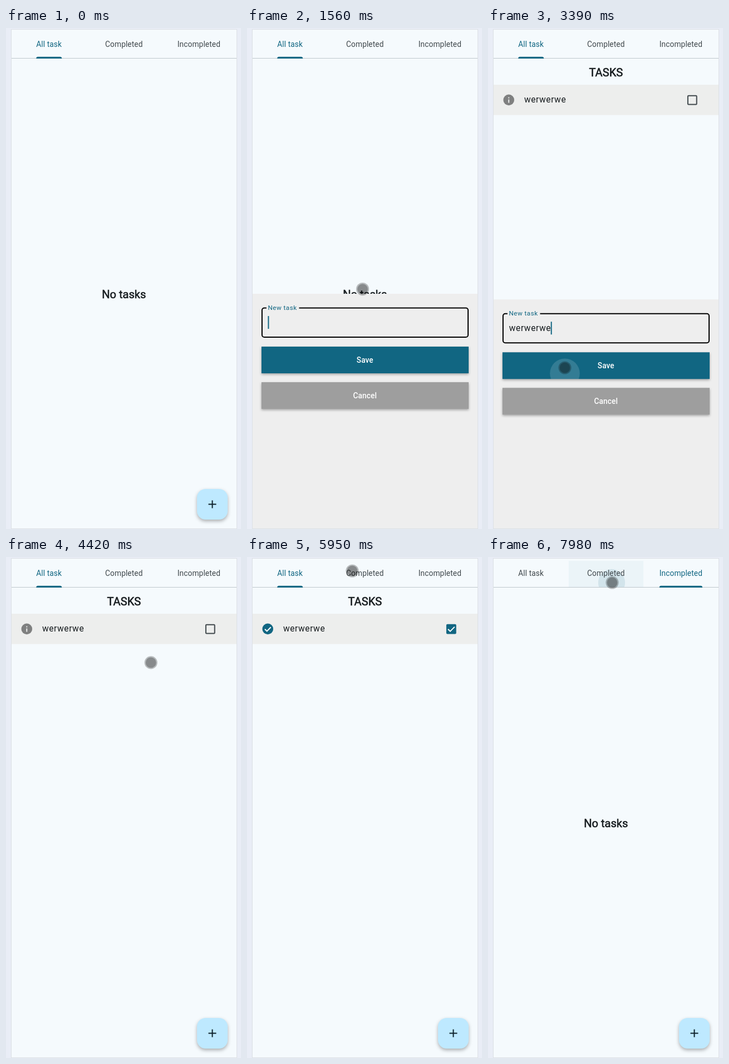
Recreate the animation shown at these times as an HTML page. Size 422x901 px, loop 8000 ms.

```html
<!DOCTYPE html>
<html lang="en">
<head>
<meta charset="utf-8">
<title>Task list</title>
<style>
html, body { margin: 0; width: 100%; height: 100%; overflow: hidden; background: #e9edf6; }
svg { display: block; width: 422px; height: 901px; }
text { font-family: Roboto, "Noto Sans", sans-serif; fill: #171c1f; white-space: pre; }
.mid { text-anchor: middle; }
.tab { font-size: 13.72px; letter-spacing: .1px; }
.title { font-size: 20.1px; stroke: #171c1f; stroke-width: .6px; }
.body { font-size: 15.7px; letter-spacing: .5px; }
.label { font-size: 11.8px; letter-spacing: .4px; fill: #116682; }
.button { font-size: 13.72px; font-weight: 500; letter-spacing: .1px; fill: #fff; }
.raised { filter: drop-shadow(0 2px 2px rgba(0,0,0,.32)); }
.fab { filter: drop-shadow(0 3px 3px rgba(0,0,0,.3)); }
.check { fill: none; stroke: #fff; stroke-width: 2; }
</style>
</head>
<body>
<svg viewBox="0 0 422 901">
  <defs>
    <clipPath id="panelClip"><rect x="10" y="3" width="404" height="897"/></clipPath>
    <clipPath id="tabClip1"><rect x="145" y="7" width="134" height="47"/></clipPath>
    <clipPath id="tabClip2"><rect x="279" y="7" width="135" height="47"/></clipPath>
    <clipPath id="saveClip"><rect x="26" y="573" width="372" height="48"/></clipPath>
    <clipPath id="fabClip"><rect x="343" y="829" width="55" height="55" rx="15.5"/></clipPath>
  </defs>
  <rect width="422" height="901" fill="#e9edf6"/>
  <rect x="9.5" y="2.5" width="405" height="898" fill="#f5fafd" stroke="#dce0e5"/>
  <g clip-path="url(#panelClip)">
    <path d="M10 54.5H414" stroke="#bfc7cc"/>
    <rect id="hover1" x="145" y="7" width="134" height="47" fill="#116682"/>
    <rect id="hover2" x="279" y="7" width="135" height="47" fill="#116682"/>
    <g clip-path="url(#tabClip1)">
      <circle id="rippleA" cx="189" cy="28" fill="#116682"/>
      <circle id="rippleC" cx="222" cy="46" fill="#116682"/>
    </g>
    <g clip-path="url(#tabClip2)"><circle id="rippleB" cx="323" cy="31" fill="#116682"/></g>
    <text id="tab0" class="tab mid" x="77.2" y="34.4">All task</text>
    <text id="tab1" class="tab mid" x="211.8" y="34.4">Completed</text>
    <text id="tab2" class="tab mid" x="346.4" y="34.4">Incompleted</text>
    <path id="bar" fill="#116682"/>

    <text id="empty" class="title mid" x="211.8" y="486">No tasks</text>
    <g id="list">
      <text class="title mid" x="211.8" y="86.7">TASKS</text>
      <rect x="10" y="102" width="404" height="54.5" fill="#edeeed"/>
      <text class="body" x="65" y="134.3">werwerwe</text>
      <g id="open">
        <circle cx="37.3" cy="129.4" r="9.8" fill="#7f8080"/>
        <path d="M37.3 128.4v6M37.3 124.5v2" stroke="#edeeed" stroke-width="2"/>
        <rect x="358.9" y="121.7" width="15.8" height="15.8" rx="1.2" fill="none" stroke="#40484c" stroke-width="2"/>
      </g>
      <g id="done">
        <circle cx="37.3" cy="129.4" r="9.8" fill="#116682"/>
        <path class="check" d="M32.1 129.7l3.7 3.7l7-7.2"/>
        <rect x="357.9" y="120.7" width="17.8" height="17.8" rx="2" fill="#116682"/>
        <path class="check" d="M361 129.7l3.9 3.9l7.9-8"/>
      </g>
      <circle id="rippleBox" cx="366.6" cy="129.6" fill="#116682"/>
    </g>

    <g class="fab"><rect x="343" y="829" width="55" height="55" rx="15.5" fill="#bee9ff"/></g>
    <g clip-path="url(#fabClip)"><circle id="rippleFab" cx="361" cy="848" fill="#001f2a"/></g>
    <path d="M363.5 856.5h14M370.5 849.5v14" stroke="#0c2029" stroke-width="2"/>

    <g id="sheet">
      <rect x="10" y="478" width="404" height="425" fill="#eeeeee"/>
      <path d="M35 503.5H31a4 4 0 0 0-4 4V552a4 4 0 0 0 4 4H393a4 4 0 0 0 4-4V507.500a4 4 0 0 0-4-4H93.500" fill="none" stroke="#000" stroke-width="2"/>
      <text class="label" x="37.500" y="507">New task</text>
      <text id="typed" class="body" x="37.8" y="534.8"></text>
      <rect id="caret" y="518" width="2" height="23" fill="#116682"/>
      <g class="raised"><rect x="26" y="573" width="372" height="48" fill="#116682"/></g>
      <g clip-path="url(#saveClip)"><circle id="rippleSave" cx="138" cy="611" fill="#fff"/></g>
      <text class="button mid" x="211.8" y="602">Save</text>
      <g class="raised"><rect x="26" y="637" width="372" height="48" fill="#9e9e9e"/></g>
      <text class="button mid" x="211.8" y="665.8">Cancel</text>
    </g>
  </g>
  <g id="pointer">
    <circle r="11.6" fill="#000" fill-opacity=".25"/>
    <circle r="9.4" fill="#000" fill-opacity=".26"/>
  </g>
</svg>
<script>
const LOOP = 8000;
const $ = id => document.getElementById(id);
const clamp = v => Math.max(0, Math.min(1, v));
const span = (t, from, length) => clamp((t - from) / length);
const smooth = p => p * p * (3 - 2 * p);
const mix = (a, b, p) => a + (b - a) * p;
const show = (id, on) => { $(id).style.display = on ? '' : 'none'; };

// time, x, y
const path = [
  [190, 373, 884], [400, 369, 866], [610, 367, 855], [810, 366, 854],
  [1010, 364, 851], [1150, 361, 848], [1260, 361, 848], [1380, 300, 640],
  [1500, 225, 446], [1640, 185, 500], [1770, 164, 540], [2100, 135, 560],
  [2370, 122, 570], [2640, 134, 600], [2850, 138, 611], [3400, 138, 611],
  [3700, 190, 400], [4020, 253, 203], [4150, 253, 203], [4420, 260, 190],
  [4880, 361, 138], [5240, 361, 137], [5500, 270, 45], [5740, 215, 12],
  [5950, 189, 25], [6230, 190, 28], [6580, 310, 30], [6930, 320, 32],
  [7420, 317, 38], [7500, 317, 44], [7670, 270, 49], [7850, 223, 46]
];

const typing = [2080, 2200, 2330, 2500, 2710, 2780, 2850, 2920];
const word = 'werwerwe';
const tabEdges = [[54.3, 100.2], [177.5, 245.500], [307.8, 385]];
const tabMoves = [[6200, 0, 1], [6888, 1, 2]];
// id, press, release, top radius, opacity
const ripples = [
  ['rippleFab', 1180, 1250, 60, .1],
  ['rippleSave', 3250, 3340, 150, .14],
  ['rippleBox', 5060, 5150, 17.5, .11],
  ['rippleA', 6090, 6200, 80, .11],
  ['rippleB', 6780, 6888, 80, .11],
  ['rippleC', 7854, 8200, 80, .11]
];

function pointerAt(t) {
  const i = path.findIndex(p => p[0] > t);
  if (i < 0) return path[path.length - 1].slice(1);
  const a = path[Math.max(0, i - 1)], b = path[i];
  const p = span(t, a[0], b[0] - a[0] || 1);
  return [mix(a[1], b[1], p), mix(a[2], b[2], p)];
}

function drawPointer(t) {
  show('pointer', t >= 190);
  $('pointer').setAttribute('transform', `translate(${pointerAt(t)})`);
}

function drawRipples(t) {
  for (const [id, down, up, top, alpha] of ripples) {
    $(id).setAttribute('r', t < down ? 0 : Math.min(top, (t - down) * .19));
    $(id).setAttribute('opacity', alpha * (1 - span(t, up + 50, 200)));
  }
  const press = (down, up) => .04 * span(t, down, 100) * (1 - span(t, up, 80));
  $('hover1').setAttribute('opacity', press(6090, 6200) + press(7854, 8200));
  $('hover2').setAttribute('opacity', press(6780, 6888));
}

function drawTabs(t) {
  const [start, from, to] = t < 6800 ? tabMoves[0] : tabMoves[1];
  const p = smooth(span(t, start, 300));
  const angle = p * Math.PI / 2;
  const left = mix(tabEdges[from][0], tabEdges[to][0], 1 - Math.cos(angle));
  const right = mix(tabEdges[from][1], tabEdges[to][1], Math.sin(angle));
  $('bar').setAttribute('d', `M${left} 55v-.5a2.8 2.8 0 0 1 2.8-2.700H${right - 2.8}a2.8 2.8 0 0 1 2.8 2.700v.5z`);
  for (let i = 0; i < 3; i++) {
    const on = i === to ? p : i === from ? 1 - p : 0;
    $('tab' + i).style.fill = `rgb(${mix(64, 17, on)},${mix(72, 102, on)},${mix(76, 130, on)})`;
  }
}

function drawSheet(t) {
  const rise = 1 - Math.pow(1 - span(t, 1250, 250), 3);
  const fall = Math.pow(span(t, 3360, 200), 2);
  show('sheet', t > 1250 && t < 3560);
  $('sheet').setAttribute('transform', `translate(0 ${425 * (1 - rise + fall)})`);
  const text = word.slice(0, typing.filter(at => at <= t).length);
  if ($('typed').textContent !== text) $('typed').textContent = text;
  const width = text ? $('typed').getComputedTextLength() : 0;
  $('caret').setAttribute('x', 37.500 + width);
}

function drawList(t) {
  const listed = t >= 3380 && t < 7000;
  show('list', listed);
  show('empty', !listed);
  const checked = span(t, 5150, 120);
  $('done').setAttribute('opacity', checked);
  show('open', checked < 1);
}

function draw(t) {
  drawTabs(t);
  drawList(t);
  drawSheet(t);
  drawRipples(t);
  drawPointer(t);
}

const begin = performance.now();
function tick() {
  draw((performance.now() - begin) % LOOP);
  requestAnimationFrame(tick);
}
draw(0);
requestAnimationFrame(tick);
</script>
</body>
</html>
```
